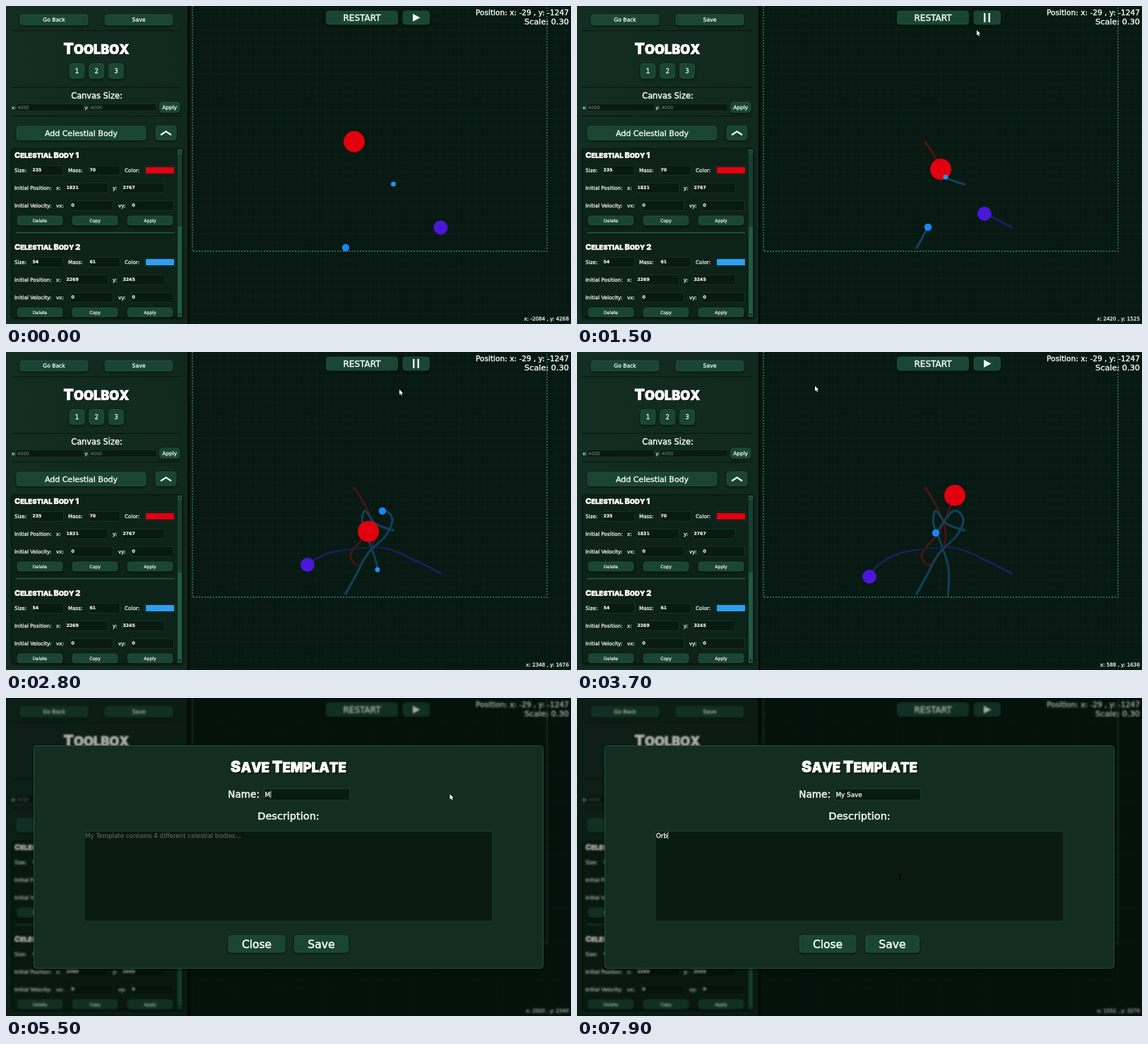
An HTML page with a canvas for the animation above (8 s loop, 800x450 px).

```html
<!DOCTYPE html>
<html lang="en">
<head>
<meta charset="utf-8">
<title>Orbit sandbox</title>
<style>
html, body { margin: 0; width: 100%; height: 100%; overflow: hidden; background: #040f0a; }
canvas { position: absolute; left: 0; top: 0; }
</style>
</head>
<body>
<canvas id="scene" width="800" height="450"></canvas>
<canvas id="top" width="800" height="450"></canvas>
<script>
const sceneCanvas = document.getElementById('scene');
const scene = sceneCanvas.getContext('2d');
const overlay = document.getElementById('top').getContext('2d');
let c = scene;

const LOOP = 8, PLAY = 0.65, PAUSE = 3.3, MODAL = 4.15;
const NAME_FOCUS = 5, DESC_FOCUS = 7.05;
const WHITE = '#f4faf7', FIELD = '#091a13', EDGE = '#173d30', HINT = '#66756e';
const WORLD = { left: 264, right: 766, bottom: 347 };

// Every body passes its key points at these shared times.
const KEYS = [PLAY, 1.5, 1.85, 2.1, 2.4, 2.8, PAUSE];
const bodies = [
  { r: 15, fill: '#e2000f', trail: '#4a1512',
    path: [[493, 192], [515, 231], [521.5, 267], [501.5, 301], [488, 286], [513, 254], [535, 203]] },
  { r: 3.5, fill: '#2391f0', trail: '#13425a',
    path: [[548.5, 252], [522, 242], [508, 225], [504.5, 241.5], [515, 270], [526, 308], [524, 362]] },
  { r: 10, fill: '#4a17d8', trail: '#1b2059',
    path: [[615.5, 313.5], [577, 294], [532, 277], [474.5, 281], [449, 288], [427, 301], [414, 318]] },
  { r: 5.2, fill: '#1a86fa', trail: '#13425a',
    path: [[481, 342], [497, 313], [513, 284], [537.5, 260], [547, 237], [533, 225], [508, 256]] }
];

// Places the pointer rests at.
const visits = [
  { x: 3, y: 377, from: 0, to: .1 },
  { x: 575, y: 15, from: .6, to: 1.2 },
  { x: 557, y: 53, from: 1.8, to: 2.8 },
  { x: 580, y: 15, from: 3.15, to: 3.4 },
  { x: 337, y: 48, from: 3.7, to: 3.7 },
  { x: 208, y: 21, from: 4, to: 4.4 },
  { x: 430, y: 137, from: 4.9, to: 5.1 },
  { x: 628.5, y: 136, from: 5.4, to: 6.4 },
  { x: 457.5, y: 253, from: 7, to: LOOP }
];

// Cubic Hermite through the points, starting from rest.
function spline(path, t) {
  const last = path.length - 1;
  let i = 0;
  while (i < last - 1 && t > KEYS[i + 1]) i++;
  const h = KEYS[i + 1] - KEYS[i], u = Math.min(1, Math.max(0, (t - KEYS[i]) / h));
  const slope = (k, d) => {
    const p = k - 1, q = Math.min(last, k + 1);
    return k ? (path[q][d] - path[p][d]) / (KEYS[q] - KEYS[p]) : 0;
  };
  const v = u * u, w = v * u;
  return [0, 1].map(d => (2 * w - 3 * v + 1) * path[i][d] + (w - 2 * v + u) * h * slope(i, d)
    + (3 * v - 2 * w) * path[i + 1][d] + (w - v) * h * slope(i + 1, d));
}

function pointerAt(t) {
  const n = visits.findLastIndex(v => t >= v.from), a = visits[n], b = visits[n + 1];
  if (!b || t <= a.to) return [a.x, a.y];
  const u = (t - a.to) / (b.from - a.to), e = u * u * (3 - 2 * u);
  return [a.x + (b.x - a.x) * e, a.y + (b.y - a.y) * e];
}

// White labels get a hairline outline for a medium weight.
function text(s, x, y, size, align = 'left', color = WHITE, weight = 400) {
  c.font = `${weight} ${size}px "DejaVu Sans", sans-serif`;
  c.textAlign = align;
  c.fillStyle = c.strokeStyle = color;
  c.lineWidth = size * .035;
  c.fillText(s, x, y + size * .365);
  if (color === WHITE) c.strokeText(s, x, y + size * .365);
}

// Small capitals in a heavy face.
function heading(s, x, y, size, centered) {
  const setFont = ch => c.font =
    `900 ${/[A-Z0-9]/.test(ch) ? size : size * .86}px Inter, "DejaVu Sans", sans-serif`;
  const widths = [...s].map(ch => (setFont(ch), c.measureText(ch.toUpperCase()).width));
  if (centered) x -= widths.reduce((p, q) => p + q) / 2;
  c.textAlign = 'left';
  c.save();
  c.shadowColor = '#000';
  c.shadowOffsetX = c.shadowOffsetY = size / 14;
  c.shadowBlur = 1;
  c.fillStyle = c.strokeStyle = '#fff';
  c.lineWidth = size * .035;
  [...s].forEach((ch, i) => {
    setFont(ch);
    c.fillText(ch.toUpperCase(), x, y);
    c.shadowColor = 'transparent';
    c.strokeText(ch.toUpperCase(), x, y);
    c.shadowColor = '#000';
    x += widths[i];
  });
  c.restore();
}

function rect(x, y, w, h, fill) {
  c.fillStyle = fill;
  c.fillRect(x, y, w, h);
}

function disc(x, y, r, fill) {
  c.beginPath();
  c.arc(x, y, r, 0, 7);
  c.fillStyle = fill;
  c.fill();
}

function line(points, color, width, dash = []) {
  c.beginPath();
  points.forEach(p => c.lineTo(...p));
  c.strokeStyle = color;
  c.lineWidth = width;
  c.setLineDash(dash);
  c.stroke();
  c.setLineDash([]);
}

function polygon(points, fill) {
  c.beginPath();
  points.forEach(p => c.lineTo(...p));
  c.closePath();
  c.fillStyle = fill;
  c.fill();
}

function field(x, y, w, h, edge = EDGE) {
  rect(x, y, w, h, FIELD);
  c.strokeStyle = edge;
  c.lineWidth = .7;
  c.strokeRect(x + .5, y + .5, w - 1, h - 1);
}

function box(x, y, w, h, fill, edge, radius = 4) {
  c.save();
  c.beginPath();
  c.roundRect(x, y, w, h, radius);
  c.shadowColor = '#000a';
  c.shadowBlur = 4;
  c.shadowOffsetY = 1.5;
  c.fillStyle = fill;
  c.fill();
  c.restore();
  c.strokeStyle = edge;
  c.lineWidth = .8;
  c.stroke();
}

function button(x, y, w, h, label = '', size = 8, hover = false) {
  const g = hover ? 1.5 : 0;
  box(x - g * 2, y - g, w + g * 4, h + g * 2, hover ? '#225843' : '#1a4535', hover ? '#2c6c54' : '#205541');
  text(label, x + w / 2, y + h / 2, size + g / 3, 'center');
}

function bodyCard(y, n, size, mass, color, px, py) {
  const entry = (label, lx, x, row, w, value) => {
    text(label, lx, y + row, 7.2);
    field(x, y + row - 7, w, 15);
    text(value, x + 1.5, y + row, 6.2, 'left', WHITE, 700);
  };
  heading('Celestial Body ' + n, 12, y + 4, 11);
  entry('Size:', 12, 36, 21, 46, size);
  entry('Mass:', 88, 117, 21, 45, mass);
  text('Color:', 168, y + 21, 7.2);
  field(196, y + 15, 44, 13);
  rect(198, y + 17, 40, 9, color);
  text('Initial Position:', 12, y + 46, 7.2);
  entry('x:', 71, 84, 46, 61, px);
  entry('y:', 151, 164, 46, 61, py);
  text('Initial Velocity:', 12, y + 71, 7.2);
  entry('vx:', 71, 91, 71, 61, '0');
  entry('vy:', 159, 177, 71, 61, '0');
  ['Delete', 'Copy', 'Apply'].forEach((s, i) => button(16 + 78 * i, y + 86, 64, 13, s, 6.2));
  rect(14, y + 109, 224, 1.5, '#1e5a45');
}

function drawSidebar(saveHover) {
  const bg = c.createLinearGradient(0, 0, 257, 0);
  bg.addColorStop(0, '#132d23');
  bg.addColorStop(1, '#11281f');
  rect(0, 0, 257, 450, bg);
  rect(257, 0, 2.5, 450, '#020805');
  button(20, 12, 96, 15, 'Go Back', 7.6);
  button(140, 12, 96, 15, 'Save', 7.8, saveHover);
  for (const y of [34, 114.5, 155]) rect(8, y, 241, 1.5, '#0a1c15');
  heading('Toolbox', 128, 67.5, 21, true);
  for (let i = 0; i < 3; i++) button(90 + 27.7 * i, 81.5, 21, 21, String(i + 1), 8.5);
  text('Canvas Size:', 128.5, 127, 11.4, 'center');
  ['x:', 'y:'].forEach((s, i) => {
    const x = 8 + 103.5 * i;
    text(s, x, 143.5, 6);
    field(x + 6, 138, 96, 11);
    text('4000', x + 8, 143.5, 6.6, 'left', '#7d8a84');
  });
  button(217.5, 136, 28.5, 14.5, 'Apply', 7.4);
  button(15, 170, 183, 19.5, 'Add Celestial Body', 11);
  button(212, 169.5, 29, 20);
  line([[219, 182.5], [226.5, 177.5], [234, 182.5]], WHITE, 2.2);

  box(8, 202, 242, 239, '#0d2219', '#07140e', 3);
  c.save();
  c.beginPath();
  c.rect(8.5, 202.5, 241, 238);
  c.clip();
  bodyCard(211, 1, '235', '70', '#e2000f', '1831', '2767');
  bodyCard(341, 2, '54', '61', '#2f9df0', '2269', '3245');
  rect(243, 203, 6, 237, '#205a46');
  rect(243, 209, 6, 103, '#163f31');
  for (const [y, d] of [[206, -1.5], [437, 1.5]])
    polygon([[244, y - d], [248, y - d], [246, y + d]], '#0b2119');
  c.restore();
}

function drawBodies(now) {
  const inWorld = p => p[1] < WORLD.bottom;
  for (const b of bodies)
    for (let s = PLAY; s <= now; s += 1 / 60) {
      const p = spline(b.path, s);
      if (inWorld(p)) disc(...p, 1.5, b.trail);
    }
  for (const b of bodies) {
    const p = spline(b.path, now);
    if (inWorld(p)) disc(...p, b.r, b.fill);
  }
}

function drawSpace(t, x, y) {
  const { left, right, bottom } = WORLD, step = (right - left) / 40;
  rect(259, 0, 541, 450, '#071912');
  for (let gx = left; gx < 800; gx += step) rect(gx, 0, 1, 450, '#0a2018');
  for (let gy = bottom % step; gy < 450; gy += step) rect(259, gy, 541, 1, '#0a2018');
  line([[left, 0], [left, bottom], [right, bottom], [right, 0]], '#2a6c55', 1.8, [2, 2]);
  drawBodies(Math.min(t, PAUSE));

  const hover = overPlay(x, y), g = hover ? 1 : 0;
  button(453.5, 7, 101, 19, 'RESTART', 12);
  button(562, 7, 37.5, 19, '', 8, hover);
  if (t >= PLAY && t < PAUSE)
    for (const bx of [576 - g, 582.5 + g]) rect(bx, 10 - g, 2.5, 13 + 2 * g, WHITE);
  else
    polygon([[576 - g, 11 - g], [586.5 + g, 16.5], [576 - g, 22 + g]], WHITE);

  text('Position: x: -29 , y: -1247', 797, 9.5, 10.6, 'right');
  text('Scale: 0.30', 797, 21.5, 11.3, 'right');
  const wx = Math.round(2348 + (x - 557) * 8), wy = Math.round(1676 + (y - 53) * 8);
  text(`x: ${wx} , y: ${wy}`, 797, 442.5, 7.2, 'right');
}

const typed = (s, t, start, gap) => s.slice(0, Math.max(0, Math.floor((t - start) / gap) + 1));

function entryText(value, hint, x, y, size, focus) {
  text(value || hint, x, y, size, 'left', value ? WHITE : HINT);
  if (focus) rect(x + (value ? c.measureText(value).width : 0) + .4, y - 5, .8, 10, WHITE);
}

function drawModal(t) {
  rect(0, 0, 800, 450, 'rgba(0,4,2,.32)');
  box(39.5, 67.5, 721, 315, '#142d23', '#24614c');
  heading('Save Template', 400, 105, 21.5, true);
  text('Name:', 359, 136.5, 13.6, 'right');
  field(365, 128, 122, 17, '#1c4a3a');
  entryText(typed('My Save', t, 5.45, .13), 'My Template', 366.5, 136.5, 8.8,
    t > NAME_FOCUS && t < DESC_FOCUS);
  text('Description:', 400, 166.5, 14.5, 'center');
  field(110.5, 188, 579, 128.5, '#1f4d3d');
  entryText(typed('Orb', t, 7.4, .2), 'My Template contains 4 different celestial bodies...',
    112, 194.5, 8.7, t > DESC_FOCUS);
  button(315, 336, 80, 24, 'Close', 15.4);
  button(408.5, 336, 76, 24, 'Save', 15.6);
}

const inside = (x, y, l, t, r, b) => x > l && x < r && y > t && y < b;
const overPlay = (x, y) => inside(x, y, 562, 7, 600, 26);
const overSave = (x, y) => inside(x, y, 140, 12, 236, 27);
const overField = (x, y) => inside(x, y, 365, 128, 487, 145) || inside(x, y, 111, 188, 689, 316);

function drawPointer(t, x, y) {
  const modal = t >= MODAL;
  if (modal && overField(x, y)) {
    rect(x - .4, y - 3.5, .9, 7, '#000');
    for (const end of [-4, 3.3]) rect(x - 1.5, y + end, 3, .7, '#000');
    return;
  }
  c.beginPath();
  if (!modal && (overPlay(x, y) || overSave(x, y))) {
    c.roundRect(x - 1, y, 2, 7, 1);
    c.roundRect(x - 3.5, y + 4, 7.5, 6.5, 2);
  } else {
    for (const [dx, dy] of [[0, 0], [0, 7.4], [1.7, 5.9], [2.9, 8.6], [4.1, 8.1], [3, 5.4], [5.2, 5.2]])
      c.lineTo(x + dx, y + dy);
    c.closePath();
  }
  c.fillStyle = '#fff';
  c.strokeStyle = '#000';
  c.lineWidth = 1;
  c.stroke();
  c.fill();
}

function frame(ms) {
  const t = (ms / 1000) % LOOP, [x, y] = pointerAt(t), modal = t >= MODAL;
  c = scene;
  drawSpace(t, x, y);
  drawSidebar(overSave(x, y));
  sceneCanvas.style.filter = modal ? 'blur(.8px)' : 'none';
  c = overlay;
  c.clearRect(0, 0, 800, 450);
  if (modal) drawModal(t);
  if (t > .1) drawPointer(t, x, y);
  requestAnimationFrame(frame);
}
requestAnimationFrame(frame);
</script>
</body>
</html>
```
